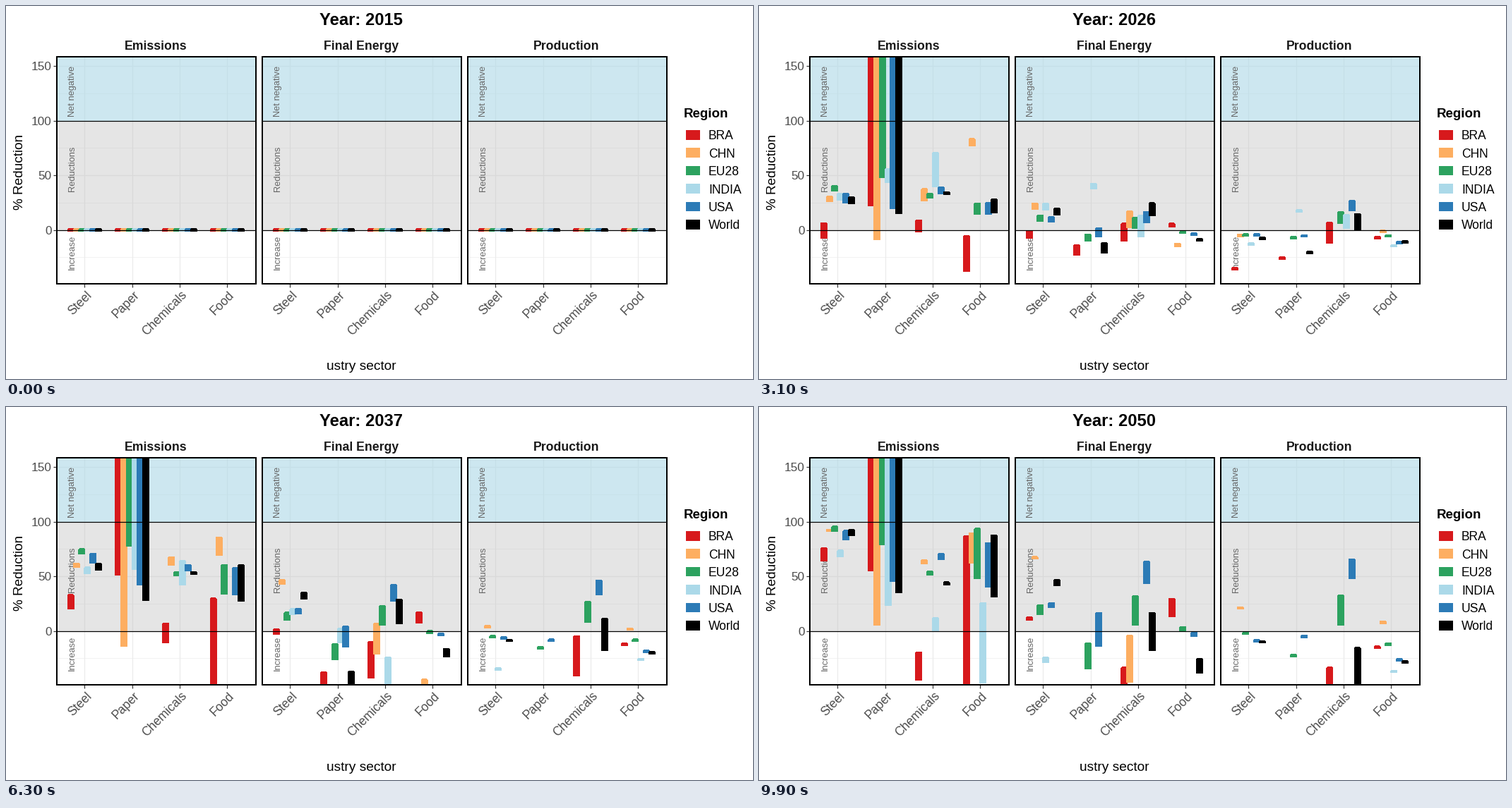
These frames come from a looping animation (1058x529 px, 10000 ms). A matplotlib script:

```python
import numpy as np
import matplotlib.pyplot as plt
from matplotlib.animation import FuncAnimation
from matplotlib.collections import PolyCollection
from matplotlib.patches import Rectangle

W, H, DPI = 1058, 529, 64
PT = 72 / DPI                      # points per pixel
FRAMES, INTERVAL = 100, 100
FIRST, KNEE, LAST = 2015, 2020.66, 2050
PANEL_X, PANEL_W, PANEL_STEP = 71.5, 282, 291
TOP, BOTTOM = 71, 393
SECTOR_X, SECTOR_STEP, DODGE, BAR_W = 111, 67.3, 7.84, 9
MIN_H, CHAMFER = 3.8, 1.4
HUGE = 5000                        # height that soon leaves the panel

PANELS = ["Emissions", "Final Energy", "Production"]
SECTORS = ["Steel", "Paper", "Chemicals", "Food"]
REGIONS = {"BRA": "#D7191C", "CHN": "#FDAE61", "EU28": "#2CA25F",
           "INDIA": "#ABD9E9", "USA": "#2C7BB6", "World": "#000000"}

plt.rcParams["font.family"] = "Liberation Sans"
bars = []


def curve(start, end, bow=0, height=0, last_height=None):
    """Lower edge: parabola from start to end, lifted by bow halfway."""
    if last_height is None:
        last_height = height
    return start, end, bow, height, last_height


def group(panel, sector, *curves, ease=1):
    """One bar per region; bar heights grow with the given power of time."""
    x = SECTOR_X + panel * PANEL_STEP + sector * SECTOR_STEP
    for k, c in enumerate(curves):
        bars.append((x + (k - 2.5) * DODGE, ease, *curve(*c)))


group(0, 0, (-17, 64, -9, 15, 12), (9, 91, 3, 6, 2), (14, 91, 13, 5),
      (12, 68, 9, 6), (1, 83, 15, 9), (8, 87, 3, 6))
group(0, 1, (0, 55, 20, 66, HUGE), (1, 5, -18, 28, HUGE), (24, 79, 23, 23, HUGE),
      (24, 23, 33, 2, 330), (2, 45, 16, 22, HUGE), (7, 35, 5, 21, HUGE), ease=2)
group(0, 2, (-5, -45, 17, 8, 26), (0, 61, 26, 13, 4), (13, 51, 16, 4),
      (25, 0, 32, 36, 12), (19, 65, 10, 6), (14, 42, 22, 3))
group(0, 3, (-20, -80, -12, 3, 167), (81, 62, -1, 2, 28), (3, 48, 5, 3, 46),
      (-200, -48, -60, 10, 74), (1, 40, 10, 5, 41), (8, 31, 6, 3, 57))

group(1, 0, (-7, 10, -6, 8, 3), (6, 66, 3, 7, 2), (8, 15, -2, 5, 9),
      (8, -29, 28, 7, 5), (2, 21, 3, 5), (5, 41, 4, 6))
group(1, 1, (-4, -110, 0, 2, 45), (-19, -250, 0, 3), (0, -35, -7, 3, 24),
      (21, -200, 95, 2, 22), (0, -14, -7, 4, 31), (-2, -110, 0, 2, 45))
group(1, 2, (3, -85, 4, 9, 52), (13, -47, 0, 9, 43), (-2, 5, 3, 7, 27),
      (6, -120, 17, 18, 30), (-5, 43, 5, 8, 21), (11, -18, 12, 7, 35))
group(1, 3, (0, 13, 0, 1, 17), (1, -90, 0, 2, 10), (-3, 0, -1, 1, 4),
      (-75, -75), (-4, -5, 0, 0, 4), (-4, -39, 0, 0, 14))

group(2, 0, (-23, -85, -2), (-7, 21, -5), (-3, -2, -3),
      (-7, -75, 11), (-3.5, -9), (-7, -10))
group(2, 1, (-8, -105), (-35, -200), (-2, -22.5, -2),
      (10, -270, 98), (-2, -5, -5), (-6.5, -95, 3))
group(2, 2, (-3, -90, 11, 11, 57), (-45, -200, 0, 16), (3, 5, 4, 7, 28),
      (15, -240, 55, 10, 26), (9, 48, 2, 8, 18), (1, -60, 16, 9, 45))
group(2, 3, (-4, -15, -2), (-2, 8, -2), (-4, -12), (-8.5, -37, -1.5),
      (-8, -26.5), (-6, -28.5, -1.5))

centres, ease, start, end, bow, height, last_height = np.array(bars).T
left, right = centres - BAR_W / 2, centres + BAR_W / 2


def to_y(value):
    return 317 - 1.55 * value


fig = plt.figure(figsize=(W / DPI, H / DPI), dpi=DPI, facecolor="white")
ax = fig.add_axes([0, 0, 1, 1])
# Whole numbers fall on pixel centres, nudged to round the same way.
ax.set(xlim=(-0.4, W - 0.4), ylim=(H - 0.55, -0.55))
ax.axis("off")


def text(x, y, s, size, **kw):
    kw = {"ha": "center", "va": "baseline", "rotation_mode": "anchor", **kw}
    return ax.text(x, y, s, fontsize=size * PT, **kw)


def line(x0, y0, x1, y1, colour, width, z):
    ax.plot([x0, x1], [y0, y1], color=colour, lw=width * PT, zorder=z,
            solid_capstyle="butt")


def rect(x, y, w, h, **kw):
    ax.add_patch(Rectangle((x, y), w, h, **kw))


for p, name in enumerate(PANELS):
    dx = p * PANEL_STEP
    x0, x1 = PANEL_X + dx, PANEL_X + dx + PANEL_W
    for v in range(-25, 151, 25):
        line(x0, to_y(v), x1, to_y(v), "#EBEBEB", 0.6 if v % 50 else 1.2, 1)
    for s, sector in enumerate(SECTORS):
        cx = SECTOR_X + dx + s * SECTOR_STEP
        line(cx, TOP, cx, BOTTOM, "#EBEBEB", 1.2, 1)
        line(cx, BOTTOM, cx, BOTTOM + 5, "#333333", 1.2, 1)
        text(cx + 10.5, 410, sector, 17.5, ha="right", rotation=45,
             color="#4D4D4D")
    rect(x0, TOP, PANEL_W, to_y(100) - TOP, fc="#ADD8E6", alpha=0.6, lw=0, zorder=2)
    rect(x0, to_y(100), PANEL_W, to_y(0) - to_y(100), fc="#BEBEBE", alpha=0.4,
         lw=0, zorder=2)
    for y, label in ((120, "Net negative"), (230.5, "Reductions"), (349, "Increase")):
        text(96.5 + dx, y, label, 12.9, rotation=90, color="#666666", zorder=3)
    for v in (0, 100):
        line(x0, to_y(v), x1, to_y(v), "black", 1.2, 5)
    rect(x0, TOP, PANEL_W, BOTTOM - TOP, fc="none", ec="black", lw=2 * PT, zorder=6)
    text(211.7 + dx, 61.7, name, 17.6, weight="bold", color="#1A1A1A")

for v in (0, 50, 100, 150):
    line(66.5, to_y(v), PANEL_X, to_y(v), "#333333", 1.2, 1)
    text(64, to_y(v) + 6.2, str(v), 17.3, ha="right", color="#4D4D4D")

text(23.6, 234.6, "% Reduction", 19, rotation=90)
text(503.2, 515.2, "ustry sector", 19.1)
text(959.8, 157.6, "Region", 18.8, ha="left", weight="bold")
for k, (region, colour) in enumerate(REGIONS.items()):
    cy = 182.3 + 25.4 * k
    rect(962.5, cy - 6.8, 20, 13.6, fc=colour, lw=0)
    text(994.7, cy + 6.6, region, 17.5, ha="left")

title = text(502.2, 26.2, "", 23.8, weight="bold")
shapes = PolyCollection([], facecolors=list(REGIONS.values()), linewidths=0,
                        antialiaseds=False, zorder=4)
ax.add_collection(shapes, autolim=False)


def update(i):
    year = FIRST + (LAST - FIRST) * i / (FRAMES - 1)
    lead = min((year - FIRST) / (KNEE - FIRST), 1)
    t = max((year - KNEE) / (LAST - KNEE), 0)
    base = lead * (start + (end - start) * t + 4 * bow * t * (1 - t))
    tall = lead * (height + (last_height - height) * t ** ease)
    top, low = to_y(base + tall), to_y(base)
    pad = np.maximum(MIN_H - (low - top), 0) / 2
    top = np.clip(top - pad, TOP - 0.5, BOTTOM)
    low = np.clip(low + pad, TOP - 0.5, BOTTOM)
    shoulder = np.minimum(top + CHAMFER, low)
    xs = np.array([left, left, left + CHAMFER, right - CHAMFER, right, right])
    ys = np.array([low, shoulder, top, top, shoulder, low])
    shapes.set_verts(np.stack([xs.T, ys.T], axis=-1))
    title.set_text(f"Year: {round(year)}")
    return shapes, title


anim = FuncAnimation(fig, update, frames=FRAMES, interval=INTERVAL,
                     repeat=True, repeat_delay=0)
plt.show()
```
